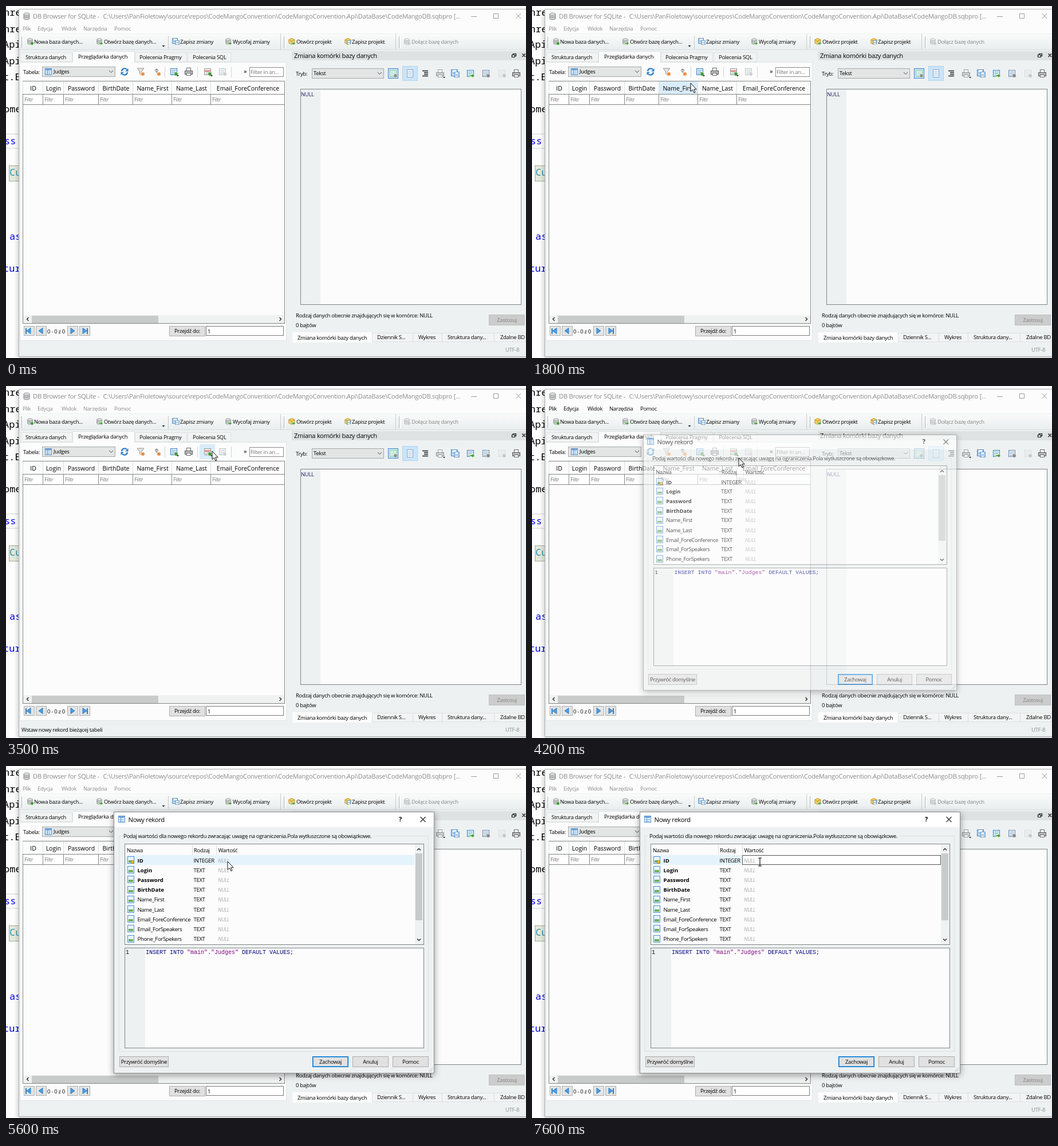
Animation of 908x616 px, one loop 8 s. Source, as an HTML page:

```html
<!DOCTYPE html>
<html lang="pl">
<head>
<meta charset="utf-8">
<title>Nowy rekord</title>
<style>
  html, body { margin: 0; width: 100%; height: 100%; overflow: hidden; background: #fdfdfd; }
  svg { display: block; width: 908px; height: 616px; }
  text { font: 9.5px "Open Sans", "Noto Sans", sans-serif; letter-spacing: -.31px; fill: #000; white-space: pre; }
  .big { font-size: 11.2px; letter-spacing: -.28px; }
  .head { font-size: 10.5px; letter-spacing: 0; }
  .bold { font-weight: 700; letter-spacing: 0; }
  .null { font-size: 9px; font-style: italic; fill: #a8a8a8; }
  .sql { font: 10px "Liberation Mono", monospace; letter-spacing: 0; fill: #000080; }
  .code { font: 17px "Noto Sans Mono", "DejaVu Sans Mono", monospace; letter-spacing: 0; }
  rect { shape-rendering: crispEdges; }
</style>
</head>
<body>
<svg id="stage" viewBox="0 0 908 616"></svg>
<script>
const LOOP = 8000, STEP = 100;
const FACE = '#eef1f1', PAPER = '#fcfcfc', EDGE = '#828585', GREY = '#8c8c8c', BLUE = '#2f7fc4', GREEN = '#3f9a35';

const box = (x, y, w, h, fill, stroke) => stroke
  ? `<rect x="${x + .5}" y="${y + .5}" width="${w - 1}" height="${h - 1}" fill="${fill}" stroke="${stroke}"/>`
  : `<rect x="${x}" y="${y}" width="${w}" height="${h}" fill="${fill}"/>`;
// y is the middle of the line; the baseline sits on a whole pixel
const label = (x, y, text, cls = '', fill = '', anchor = 'start') =>
  `<text x="${x}" y="${Math.round(y + 3)}" class="${cls}" text-anchor="${anchor}"${fill && ` style="fill:${fill}"`}>${text}</text>`;
const line = (d, color = '#333', width = 1) =>
  `<path d="${d}" fill="none" stroke="${color}" stroke-width="${width}"/>`;
const shape = (d, fill, stroke = 'none') => `<path d="${d}" fill="${fill}" stroke="${stroke}"/>`;
const group = (id, content) => `<g id="${id}" visibility="hidden">${content}</g>`;
const at = (x, y, content, opacity = 1) => `<g transform="translate(${x} ${y})" opacity="${opacity}">${content}</g>`;
const scaled = (size, content) => `<g transform="scale(${size})">${content}</g>`;

// Icons are drawn around their centre
const badge = color => `<circle cx="4" cy="4" r="3.3" fill="${color}" stroke="#fff" stroke-width=".6"/>`;
const arrowBadge = shape('M-1 2.5H3V0L7.5 4L3 8V5.5H-1Z', GREEN, '#dff0d8');
const cylinder = shape('M-5 -4V4C-5 6.5 5 6.5 5 4V-4Z', '#c9ced0', '#888') +
  '<ellipse cy="-4" rx="5" ry="2" fill="#eee" stroke="#888"/>' + line('M-5 0C-4 2 4 2 5 0', '#888');
const sheet = (color = BLUE) => box(-6, -6, 12, 12, '#edf5fb', color) + line('M-4 -2.5H4M-4 .5H4M-4 3.5H4', color, .8);
const grid = sheet('#4d8ecb') + box(-5, -5, 10, 2, '#77aade') + line('M-1.5 -5V5', '#6fa3d3');
const floppy = box(-6, -6, 12, 12, '#a9cbea', '#4d86bf') + box(-3, -5, 6, 4, '#fff') + box(-3, 2, 6, 3, '#eaf2f9');
const stack = at(-2, -1, floppy) + at(2, 2, scaled(.75, floppy));
const cube = shape('M0 -6.5L6 -3.5V3.5L0 6.5L-6 3.5V-3.5Z', '#f4cf5c', '#b88a1f') + line('M-6 -3.5L0 -.5L6 -3.5M0 -.5V6.5', '#b88a1f');
const printer = box(-4, -7, 8, 6, '#fff', '#666') + box(-7, -2, 14, 7, '#b7bcc0', '#555') + box(-4, 2, 8, 5, '#fff', '#666');
const refresh = line('M-5 -1A5.3 5.3 0 0 1 4 -4M5 1A5.3 5.3 0 0 1 -4 4', BLUE, 2.4) +
  shape('M6.5 -6V-.5H1ZM-6.5 6V.5H-1Z', BLUE);
const funnel = shape('M-6 -6H6L1.5 0V6L-1.5 4V0Z', '#e2e2e2', '#999') + badge('#f08a3c');
const sort = shape('M0 -6L4 -2H-4ZM0 2L3 -1H-3Z', '#999') + badge('#f08a3c');
const drop = at(7, 7, shape('M-2 -1H2L0 1.5Z', '#222'));
const tableRow = sheet('#999') + box(-5, -3, 10, 3, '#ec9a94');
const gear = box(-9, -9, 18, 18, '#cce4f7', '#3d86c6') + sheet('#7c9') + badge('#8c8c8c');
const field = box(-6, -7, 12, 13, '#eaf4fc', '#4d8ecb') + box(-4, 0, 8, 4, '#6fae58');
const key = at(3, 3, '<circle r="2.5" fill="#f0bf3e" stroke="#a97c15"/>');

const scrollArrow = (x, y, turn) => `<g transform="translate(${x} ${y}) rotate(${turn})">${line('M-3 1.5L0 -1.5L3 1.5', '#333', 1.5)}</g>`;
const button = (x, y, w, h, text, fill = '#e1e1e1', stroke = '#adadad', color = '') =>
  box(x, y, w, h, fill, stroke) + label(x + w / 2, y + h / 2, text, '', color, 'middle');
const combo = (x, y, w, text, pad = 3) => box(x, y, w, 18, '#e3e5e5', '#a4a8a8') + label(x + pad, y + 9, text) +
  line(`M${x + w - 11} ${y + 7}l3.5 3.5l3.5 -3.5`, '#444');

const COLUMNS = [['ID', 30], ['Login', 65], ['Password', 101], ['BirthDate', 162], ['Name_First', 222],
  ['Name_Last', 290], ['Email_ForeConference', 358]];
const columnEnd = i => i + 1 < COLUMNS.length ? COLUMNS[i + 1][1] : 487;

function editorBehind() {
  const code = [[-4, 12, 'nre'], [-4, 41, 'nre'], [-5, 68, 'Api'], [-5, 97, 'Api'], [-5, 125, 't.E'], [-4, 181, 'ome'],
    [-3, 237, 'ss', '#0000e0'], [6, 292, 'Cu', '#2b91af'], [6, 404, 'as', '#0000e0'], [-5, 460, 'tur', '#0000e0']];
  return box(0, 0, 908, 616, '#fdfdfd') + box(0, 223, 22, 2, '#e4e6e8') + box(0, 248, 22, 2, '#e4e6e8') +
    box(5, 279, 30, 28, '#e3eadb', '#a4a89c') +
    code.map(([x, y, text, color]) => label(x, y + 2, text, 'code', color)).join('');
}

function titleAndToolbars() {
  const tools = [[42, cylinder + badge(GREEN), 49, 'Nowa baza danych...'], [163, cylinder + arrowBadge, 171, 'Otwórz bazę danych...'],
    [297, stack, 304, 'Zapisz zmiany'], [388, cylinder + arrowBadge, 396, 'Wycofaj zmiany'],
    [499, cube + arrowBadge, 507, 'Otwórz projekt'], [597, cube + at(2, 2, scaled(.7, floppy)), 604, 'Zapisz projekt']];
  const menus = [[29, 'Plik'], [55, 'Edycja'], [97, 'Widok'], [135, 'Narzędzia'], [189, 'Pomoc']];
  return box(23, 6, 885, 42, PAPER) + at(36, 18, cylinder) +
    label(47, 18.5, 'DB Browser for SQLite -', 'big', GREY) +
    label(169.5, 18.5, 'C:\\Users\\PanFioletowy\\source\\repos\\CodeMangoConvention\\CodeMangoConvention.Api\\DataBase\\CodeMangoDB.sqbpro [...', 'big', GREY) +
    line('M812 18.5H822M851.5 13.5H859.5V21.5H851.5ZM890.5 13L899 22M899 13L890.5 22', '#999') +
    `<g id="menus">${menus.map(([x, text]) => label(x, 40, text)).join('')}</g>` +
    box(23, 49, 885, 28, 'url(#bar)') + box(23, 76, 885, 1, '#d9dddd') +
    [27, 485, 686].map(x => line(`M${x}.5 53V74`, '#b4b9b9') + line(`M${x + 2}.5 53V74`, '#fff')).join('') +
    line('M283.5 52V75M479.5 49V76M680.5 49V76', '#c6cbcb') +
    tools.map(([x, icon, tx, text]) => at(x, 62, scaled(.85, icon)) + label(tx, 63, text)).join('') +
    at(275, 70, shape('M-2.5 -1H2.5L0 1.5Z', '#111')) +
    at(700, 62, scaled(.85, cylinder + badge('#aaa')), .6) + label(708, 63, 'Dołącz bazę danych', '', '#858585');
}

function browsePane() {
  const tabs = [[25, 91, 34, 'Struktura danych'], [225, 91, 233, 'Polecenia Pragmy'], [317, 76, 326, 'Polecenia SQL']];
  const icons = [[207, refresh], [235, funnel], [263, sort], [293, sheet() + badge(GREEN) + drop], [319, printer]];
  return box(24, 98, 466, 488, PAPER, '#e1e5e5') +
    tabs.map(([x, w, tx, text]) => box(x, 81, w, 17, '#f2f4f4', '#dde1e1') + label(tx, 90, text)).join('') +
    box(116, 79, 109, 20, PAPER, '#dde1e1') + box(117, 97, 107, 3, PAPER) + label(126, 89, 'Przeglądarka danych') +
    label(30, 116, 'Tabela:') + combo(63, 106, 128, 'Judges', 20) + at(74, 115, grid) +
    icons.map(([x, icon]) => at(x, 115, icon)).join('') + line('M277.5 106V125M334.5 106V125M393.5 106V125', '#d2d6d6') +
    group('insertHover', box(338, 102, 27, 26, '#d9ecf9')) +
    at(352, 115, tableRow + badge(GREEN) + drop) + at(378, 115, sheet('#aaa') + badge('#bbb'), .7) +
    label(415, 115, '»', 'big') + box(425, 107, 60, 17, '#fff', '#8a8a8a') + label(427, 116, 'Filter in an...', '', '#777') +
    box(29, 131, 458, 425, PAPER, EDGE) +
    group('columnHover', '<rect id="columnFill" y="132" height="22" fill="#d9ecf9"/>') +
    COLUMNS.map(([name, x], i) => {
      const end = columnEnd(i);
      return label((x + end) / 2, 144.5, name, 'head', '', 'middle') + box(x - 1, 132, 1, 22, '#dcdfdf') +
        box(x - 1, 154, end - x + 1, 19, '#fff', EDGE) + label(x + 2, 164, 'Filtr', '', '#777');
    }).join('') +
    box(30, 541, 456, 14, '#f0f1f1') + box(45, 542, 221, 13, '#c9cbcb') + scrollArrow(38, 548, -90) + scrollArrow(479, 548, 90) +
    [[31, -1, 1], [52, -1, 0], [107, 1, 0], [128, 1, 1]].map(([x, dir, bar]) => box(x, 560, 19, 17, '#e3e5e5', '#adadad') +
      at(x + 9, 568.5, shape(`M${-3 * dir} -5L${4 * dir} 0L${-3 * dir} 5Z`, '#4f9be0', BLUE) + (bar ? box(dir > 0 ? 4 : -6, -5, 2, 10, BLUE) : ''))).join('') +
    label(72, 569.5, '0 - 0 z 0') + button(285, 560, 63, 18, 'Przejdź do:') +
    box(349, 560, 136, 17, '#fff', '#7a7a7a') + label(352, 569.5, '1');
}

function cellDock() {
  const icons = [[676, gear], [732, line('M-5 -4.5H5M-2 -1.5H5M-2 1.5H5M-5 4.5H5', '#222', 1.6)], [758, at(0, 0, printer, .6) + drop], [785, stack],
    [811, sheet() + arrowBadge], [838, sheet('#6687a8') + badge('#888')], [866, sheet('#ccc') + badge('#aaa'), .6], [891, printer]];
  const tabs = [[648, 'Dziennik S...'], [720, 'Wykres'], [771, 'Struktura dany...'], [863, 'Zdalne BD']];
  return box(499, 79, 409, 16, '#dfe2e2') + label(503, 87.5, 'Zmiana komórki bazy danych', 'big') +
    line('M883.5 85.5H888.5V89.5H883.5ZM885.5 85V83.5H890.5V87.5H889M901.5 83.5L907 89M907 83.5L901.5 89', '#111', 1.2) +
    label(506, 119, 'Tryb:') + combo(534, 109, 126, 'Tekst') +
    box(692, 105, 27, 26, '#cce4f7', '#aed4f2') + at(705, 118, box(-5, -7, 11, 14, '#f8fbfe', '#7fa7d0') + line('M-3 -3H4M-3 0H4M-3 3H4', '#9bb8d4')) +
    icons.map(([x, icon, opacity]) => at(x, 118, icon, opacity)).join('') +
    box(514, 145, 386, 378, PAPER, EDGE) + box(515, 146, 34, 376, FACE) + label(515, 154.5, 'NULL', '', '#222266') +
    label(506, 542, 'Rodzaj danych obecnie znajdujących się w komórce: NULL') + label(506, 558.5, '0 bajtów') +
    button(843, 540, 63, 19, 'Zastosuj', '#cccccc', '#bfbfbf', '#838383') +
    box(639, 572, 269, 16, '#f2f4f4', '#dde1e1') + line('M710.5 572V588M761.5 572V588M852.5 572V588', '#d9dddd') +
    tabs.map(([x, text]) => label(x, 580, text)).join('') +
    box(500, 571, 139, 18, PAPER) + label(509, 581, 'Zmiana komórki bazy danych') +
    label(872, 602, 'UTF-8', '', GREY) + group('status', label(27, 602, 'Wstaw nowy rekord bieżącej tabeli'));
}

function recordDialog() {
  const fields = ['ID', 'Login', 'Password', 'BirthDate', 'Name_First', 'Name_Last', 'Email_ForeConference', 'Email_ForSpeakers', 'Phone_ForSpekers'];
  const rows = fields.map((name, i) => {
    const y = 165.5 + i * 17.2;
    return at(218, Math.round(y - .5), field + (i ? '' : key)) + label(229.5, y, name, i < 4 ? 'bold' : '') +
      label(327.5, y, i ? 'TEXT' : 'INTEGER') + label(370, y, 'NULL', 'null');
  }).join('');
  const purple = text => `<tspan style="fill:#800080">${text}</tspan>`;
  return `<g style="filter:drop-shadow(0 3px 6px #0006)">${box(188, 80, 560, 458, FACE, '#8c9090')}</g>` +
    box(189, 81, 558, 26, '#fff') + at(202, 93, grid) + label(213.5, 94.5, 'Nowy rekord', 'big') + label(686, 93.5, '?', 'big bold') +
    line('M723.5 89L732.5 98M732.5 89L723.5 98', '#222', 1.1) +
    box(197, 122, 541, 378, 'none', '#dde1e1') + box(202, 116, 440, 13, FACE) +
    label(205, 122.5, 'Podaj wartości dla nowego rekordu zwracając uwagę na ograniczenia.Pola wytłuszczone są obowiązkowe.') +
    box(207, 136, 523, 177, PAPER, EDGE) + label(211, 147.5, 'Nazwa') + label(328, 147.5, 'Rodzaj') + label(370.5, 147.5, 'Wartość') +
    box(325, 138, 1, 18, '#dcdfdf') + box(367, 138, 1, 18, '#dcdfdf') +
    box(714, 137, 15, 175, '#f0f1f1') + box(715, 153, 12, 117, '#c9cbcb') + scrollArrow(721, 146, 0) + scrollArrow(721, 304, 180) +
    group('rowHover', box(208, 156, 505, 17, '#e5f3fc')) + group('cellEditor', box(367, 156, 347, 17, '#fff', '#555')) + rows +
    group('caret', box(370, 159, 1, 11, '#000')) +
    box(207, 318, 523, 176, PAPER, EDGE) + box(208, 319, 35, 174, FACE) + label(209, 325.5, '1', 'sql', '#111') +
    label(244, 325.5, `INSERT INTO ${purple('"main"')}.${purple('"Judges"')} DEFAULT VALUES;`, 'sql') +
    button(198, 508, 86, 19, 'Przywróć domyślne') + button(535, 508, 63, 19, 'Zachowaj', '#e1e1e1', '#0078d7') +
    box(536, 509, 61, 17, 'none', '#4da0e3') + button(605, 508, 63, 19, 'Anuluj') + button(675, 508, 63, 19, 'Pomoc') +
    line('M738 535L745 528M741 535L745 531', '#bbb');
}

const stage = document.getElementById('stage');
stage.innerHTML = `<defs>
    <linearGradient id="bar" x2="0" y2="1"><stop stop-color="#fafbfb"/><stop offset="1" stop-color="#e9eded"/></linearGradient>
    <linearGradient id="side"><stop stop-color="#000" stop-opacity="0"/><stop offset="1" stop-color="#000" stop-opacity=".12"/></linearGradient>
  </defs>` + editorBehind() + box(14, 6, 8, 608, 'url(#side)') + box(22, 5, 900, 609, FACE, '#a9adad') + box(22, 614, 886, 2, '#dfe1e1') +
  titleAndToolbars() + browsePane() + cellDock() + `<g id="dialog">${recordDialog()}</g>` +
  group('arrow', shape('M0 0V14.5L3.4 11.6L5.8 16.8L8 15.8L5.7 10.8H10.2Z', '#fff', '#111')) +
  group('beam', line('M-3 -7H-.7L0 -6.3L.7 -7H3M0 -6.3V6.3M-3 7H-.7L0 6.3L.7 7H3', '#111', 1.2));

const parts = Object.fromEntries([...stage.querySelectorAll('[id]')].map(el => [el.id, el]));
const show = (id, on) => parts[id].setAttribute('visibility', on ? 'visible' : 'hidden');

// Pointer path: time, x, y
const PATH = [[500, 903, 4], [700, 800, 30], [1000, 560, 84], [1300, 362, 118], [1500, 370, 140], [1800, 277, 135], [2000, 284, 132],
  [2300, 315, 121], [2600, 350, 114], [2900, 360, 113], [3400, 360, 113], [3500, 360, 114], [3600, 361, 119], [3900, 361, 119],
  [4100, 361, 126], [4400, 361, 126], [4500, 364, 136], [5100, 364, 136], [5600, 387, 167], [5700, 393, 167], [5800, 393, 167],
  [6000, 407, 167], [6300, 407, 167], [6400, 400, 175], [6500, 400, 175], [6700, 396, 168], [7000, 396, 168], [7100, 398, 168]];
// Dialog entrance: time, opacity, scale
const FADE = [[4000, 0, .92], [4100, .3, .955], [4200, .63, .98], [4300, .88, .995], [4400, 1, 1]];

function sample(keys, t) {
  const i = keys.findIndex(key => key[0] > t);
  if (i < 0) return keys[keys.length - 1].slice(1);
  if (i === 0) return keys[0].slice(1);
  const [from, to] = [keys[i - 1], keys[i]];
  const k = (t - from[0]) / (to[0] - from[0]);
  return from.slice(1).map((value, n) => value + (to[n + 1] - value) * k);
}

function draw(time) {
  const t = Math.floor(time % LOOP / STEP) * STEP;
  const [x, y] = sample(PATH, t);
  const editing = t >= 6400, free = t >= 500 && t < 4000;

  show('arrow', t >= 500 && !editing);
  show('beam', editing);
  parts[editing ? 'beam' : 'arrow'].setAttribute('transform', `translate(${Math.round(x)} ${Math.round(y)})`);

  const onInsert = free && x >= 338 && x <= 365 && y >= 102 && y <= 128;
  show('insertHover', onInsert);
  show('status', onInsert);
  const column = free && y >= 132 && y <= 154 ? COLUMNS.findIndex(([, left], i) => x >= left && x < columnEnd(i)) : -1;
  show('columnHover', column >= 0);
  if (column >= 0) {
    parts.columnFill.setAttribute('x', COLUMNS[column][1]);
    parts.columnFill.setAttribute('width', columnEnd(column) - COLUMNS[column][1]);
  }

  const [opacity, scale] = sample(FADE, t);
  parts.dialog.setAttribute('display', opacity > 0 ? 'inline' : 'none');
  parts.dialog.setAttribute('opacity', opacity);
  parts.dialog.setAttribute('transform', `translate(468 309) scale(${scale}) translate(-468 -309)`);
  parts.menus.setAttribute('fill-opacity', t >= 4000 && t < 4300 ? 1 : .45);

  show('rowHover', t > 4400 && y >= 156);
  show('cellEditor', t >= 6300);
  show('caret', (t >= 6300 && t < 6700) || (t >= 7400 && t < 7600));
}

const start = performance.now();
(function tick() {
  draw(performance.now() - start);
  requestAnimationFrame(tick);
})();
</script>
</body>
</html>
```
